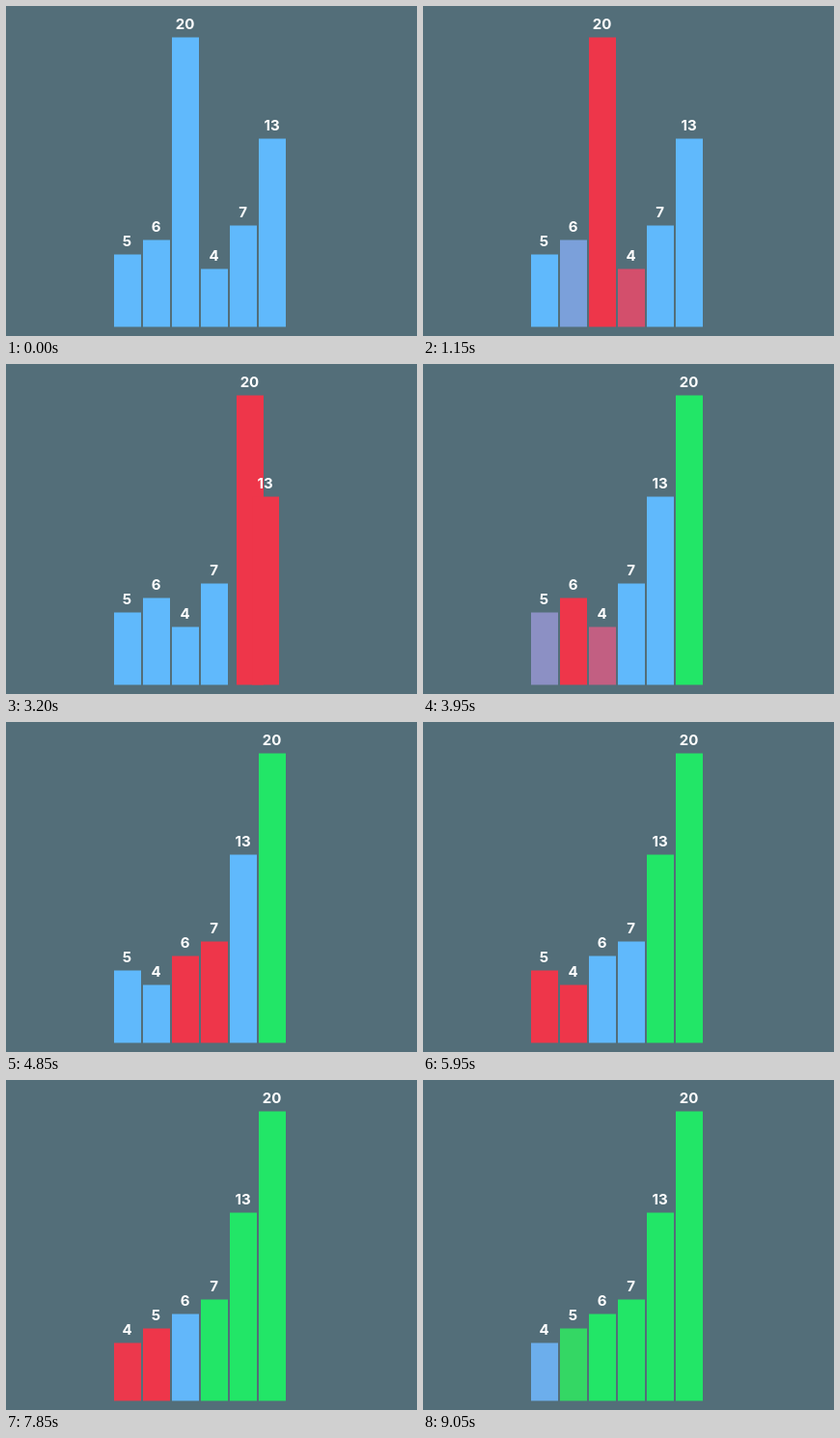
Write an HTML page that moves like this. It is 426 by 342 pixels and loops after 9100 ms.

```html
<!DOCTYPE html>
<html lang="en">
<head>
<meta charset="utf-8">
<title>Bubble sort</title>
<style>
  html, body { margin: 0; width: 100%; height: 100%; overflow: hidden; background: #536e79; }
  svg { display: block; width: 426px; height: 342px; }
  text { font: 700 15px Inter, "Open Sans", sans-serif; fill: #fff; text-anchor: middle; }
</style>
</head>
<body>
<svg id="stage" viewBox="0 0 426 342"><g id="bars"></g><g id="labels"></g></svg>
<script>
const LOOP = 9100, EASE_MS = 250;
const LEFT = 112, PITCH = 30, WIDTH = 28, FLOOR = 332.5, UNIT = 15;
const BLUE = [96, 185, 252], RED = [238, 54, 74], GREEN = [34, 230, 103];

// Start of each comparison, closed by the end of the sort, and start of each swap.
const compareAt = [25, 525, 1025, 1790, 2570, 3400, 3850, 4610, 5110, 5605,
                   6345, 6840, 7340, 7845, 8340, 8890];
const swapAt = [1530, 2300, 3158, 4350, 6085];

function add(parentId, tag, attrs) {
  const node = document.createElementNS("http://www.w3.org/2000/svg", tag);
  for (const key in attrs) node.setAttribute(key, attrs[key]);
  return document.getElementById(parentId).appendChild(node);
}

function makeBar(value, slot) {
  const height = value * UNIT, top = FLOOR - height;
  const rect = add("bars", "rect", { y: top, width: WIDTH, height });
  const label = add("labels", "text", { y: top - 8.5 });
  label.textContent = value;
  return {
    value, rect, label,
    xKeys: [{ t: 0, v: [LEFT + slot * PITCH] }],
    colorKeys: [{ t: 0, v: BLUE }]
  };
}

// A later change at the same moment replaces the earlier one.
function setKey(keys, t, v) {
  if (keys[keys.length - 1].t === t) keys.pop();
  keys.push({ t, v });
}

function planSort(bars) {
  const order = [...bars];
  let step = 0, swaps = 0;
  for (let last = order.length - 1; last > 0; last--) {
    for (let j = 0; j < last; j++) {
      const start = compareAt[step++], end = compareAt[step];
      const pair = [order[j], order[j + 1]];
      pair.forEach(bar => setKey(bar.colorKeys, start, RED));
      if (pair[0].value > pair[1].value) {
        const t = swapAt[swaps++];
        setKey(pair[0].xKeys, t, [LEFT + (j + 1) * PITCH]);
        setKey(pair[1].xKeys, t, [LEFT + j * PITCH]);
        [order[j], order[j + 1]] = [pair[1], pair[0]];
      }
      pair.forEach(bar => setKey(bar.colorKeys, end, BLUE));
    }
    setKey(order[last].colorKeys, compareAt[step], GREEN);
  }
}

// The CSS "ease" curve, cubic-bezier(.25, .1, .25, 1).
function ease(x) {
  if (x >= 1) return 1;
  let lo = 0, hi = 1;
  for (let i = 0; i < 20; i++) {
    const s = (lo + hi) / 2;
    if (0.75 * s * (1 - s) + s ** 3 < x) lo = s; else hi = s;
  }
  return 0.3 * lo * (1 - lo) ** 2 + 3 * lo * lo * (1 - lo) + lo ** 3;
}

function valueAt(keys, t) {
  let i = keys.length - 1;
  while (i > 0 && keys[i].t > t) i--;
  if (i === 0) return keys[0].v;
  const p = ease((t - keys[i].t) / EASE_MS), from = keys[i - 1].v;
  return keys[i].v.map((v, n) => from[n] + (v - from[n]) * p);
}

const bars = [5, 6, 20, 4, 7, 13].map(makeBar);
planSort(bars);

function render(t) {
  for (const bar of bars) {
    const [x] = valueAt(bar.xKeys, t);
    bar.rect.setAttribute("x", x);
    bar.rect.setAttribute("fill", `rgb(${valueAt(bar.colorKeys, t).map(Math.round)})`);
    bar.label.setAttribute("x", x + 13.5);
  }
}

const began = performance.now();
function tick() {
  render((performance.now() - began) % LOOP);
  requestAnimationFrame(tick);
}
tick();
</script>
</body>
</html>
```
